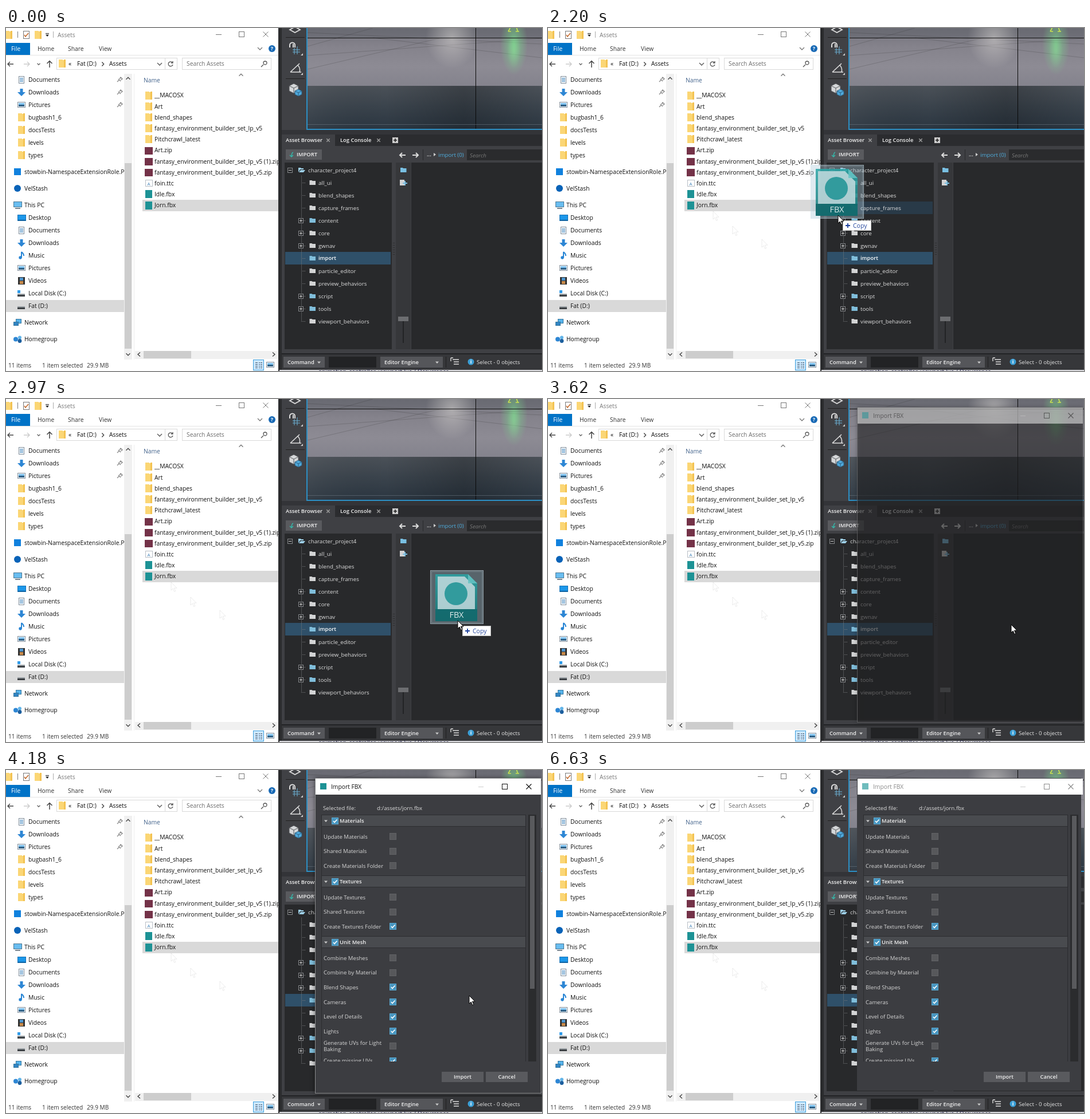
Recreate the animation shown at these times as an HTML page with a canvas. Size 935 px wide and 599 px high, loop 6750 ms.

```html
<!DOCTYPE html>
<html lang="en">
<head>
<meta charset="utf-8">
<title>Drag and drop import</title>
<style>
  html, body { margin: 0; width: 100%; height: 100%; overflow: hidden; background: #fff; }
  canvas { display: block; }
</style>
</head>
<body>
<canvas id="stage" width="935" height="599"></canvas>
<script>
const c = document.getElementById('stage').getContext('2d');
const LOOP = 6750, STEP = 110.6, LAST_STEP = 60;
const TEAL = '#1d9295';

// Drawing helpers
function rect(x, y, w, h, fill, stroke) {
  if (fill) { c.fillStyle = fill; c.fillRect(x, y, w, h); }
  if (stroke) { c.strokeStyle = stroke; c.lineWidth = 1; c.strokeRect(x + .5, y + .5, w - 1, h - 1); }
}
function path(d, x, y, fill, stroke, width = 1) {
  const shape = new Path2D(d);
  c.save();
  c.translate(x, y);
  if (fill) { c.fillStyle = fill; c.fill(shape); }
  if (stroke) { c.strokeStyle = stroke; c.lineWidth = width; c.stroke(shape); }
  c.restore();
}
function disc(x, y, r, fill) {
  c.fillStyle = fill;
  c.beginPath();
  c.arc(x, y, r, 0, 7);
  c.fill();
}
function text(s, x, y, color = '#111', size = 10.3, weight = 400, align = 'left', style = '') {
  c.font = `${style} ${weight} ${size}px "Open Sans", "Noto Sans", sans-serif`;
  c.fillStyle = color;
  c.textAlign = align;
  c.fillText(s, x, y + size * .37);
}
const label = (s, x, y, color = '#dcdcdc') => text(s, x, y, color, 9.75);
const bold = (s, x, y, color = '#f0f0f0', align) => text(s, x, y, color, 9.4, 600, align);
function clipped(x, y, w, h, draw) {
  c.save();
  c.beginPath();
  c.rect(x, y, w, h);
  c.clip();
  draw();
  c.restore();
}
function gradient(x0, y0, x1, y1, ...colors) {
  const g = c.createLinearGradient(x0, y0, x1, y1);
  colors.forEach((color, i) => g.addColorStop(i / (colors.length - 1), color));
  return g;
}
function glow(x, y, rx, ry, rgb, alpha) {
  c.save();
  c.translate(x, y);
  c.scale(rx, ry);
  const g = c.createRadialGradient(0, 0, 0, 0, 0, 1);
  g.addColorStop(0, `rgba(${rgb},${alpha})`);
  g.addColorStop(1, `rgba(${rgb},0)`);
  c.fillStyle = g;
  c.fillRect(-1, -1, 2, 2);
  c.restore();
}

const chevron = (x, y, color, size = 4, flip = 1) =>
  path(`M${-size} ${-size / 2 * flip}L0 ${size / 2 * flip}L${size} ${-size / 2 * flip}`, x, y, null, color, 1.3);
const sideChevron = (x, y, dir, color = '#444') =>
  path(`M${-2 * dir} -3.5L${2 * dir} 0L${-2 * dir} 3.5`, x, y, null, color, 1.4);
const arrow = (x, y, dir, color, width = 1.4) =>
  path(`M${-5 * dir} 0H${5 * dir}M${dir} -4L${5 * dir} 0L${dir} 4`, x, y, null, color, width);
const triangle = (x, y, color = '#ccc') => path('M-3 -1.5H3L0 2Z', x, y, color);
const cross = (x, y, r, color, width = 1) =>
  path(`M${-r} ${-r}L${r} ${r}M${r} ${-r}L${-r} ${r}`, x, y, null, color, width);

const icons = {
  folder(x, y) { rect(x - 6, y - 6, 12, 13, '#fbd675'); rect(x + 3, y - 7, 3, 14, '#f3c353'); rect(x - 6, y - 7, 7, 2, '#fbd675'); },
  doc(x, y) {
    rect(x - 5, y - 6, 10, 13, '#fff', '#7d8b99');
    for (let k = -3; k < 5; k += 2) rect(x - 3, y + k, 6, 1, '#4d8fc4');
  },
  down(x, y) { path('M-2.5 -6H2.5V0H7L0 7L-7 0H-2.5Z', x, y, '#2d86d4'); },
  pic(x, y) { rect(x - 7, y - 5, 14, 10, '#fff', '#7d8b99'); rect(x - 5, y - 3, 10, 3, '#7cc0ee'); rect(x - 5, y, 10, 3, '#2d5f85'); },
  pc(x, y) { rect(x - 7, y - 6, 15, 10, '#69bdf0', '#4a7894'); rect(x - 4, y + 5, 9, 2, '#77848e'); },
  desktop(x, y) { rect(x - 7, y - 5, 15, 11, '#1c97ea', '#1672b5'); rect(x - 6, y + 4, 13, 1, '#0c548d'); },
  music(x, y) { path('M0 -6V4M0 -6Q4 -3 4 1', x, y, null, '#2684d4', 2); disc(x - 2, y + 4, 2.7, '#2684d4'); },
  video(x, y) {
    rect(x - 6, y - 6, 12, 13, '#333');
    rect(x - 3, y - 5, 6, 5, '#4f97d1');
    rect(x - 3, y + 1, 6, 5, '#c98b4b');
  },
  disk(x, y) { rect(x - 7, y + 1, 13, 5, '#9aa0a4'); rect(x - 7, y + 3, 13, 3, '#3b3f43'); },
  system(x, y) { icons.disk(x, y); rect(x - 7, y - 5, 5, 5, '#2f9be8'); },
  network(x, y) { rect(x - 3, y - 6, 10, 8, '#56b3ec', '#33749c'); rect(x - 7, y - 1, 9, 7, '#3285c4', '#33749c'); },
  home(x, y) { disc(x - 3, y, 4, '#2d86d4'); disc(x + 4, y - 3, 3, '#62b4e8'); disc(x + 4, y + 3, 3.4, '#1d5f9e'); },
  square(x, y) { rect(x - 6, y - 6, 12, 12, '#1081de'); },
  circle(x, y) { disc(x, y, 6, '#0a63b8'); },
  zip(x, y) { rect(x - 7, y - 6, 14, 13, '#743248'); },
  font(x, y) { rect(x - 6, y - 6, 13, 12, '#fff', '#b8bec4'); text('A', x, y + 1, '#3f81b8', 8, 400, 'center'); },
  fbx(x, y) { rect(x - 6, y - 7, 12, 14, TEAL); }
};

const places = [
  ['Documents', 90, 'doc'], ['Downloads', 112, 'down'], ['Pictures', 134, 'pic'],
  ['bugbash1_6', 156, 'folder'], ['docsTests', 178, 'folder'], ['levels', 200, 'folder'], ['types', 222, 'folder'],
  ['stowbin-NamespaceExtensionRole.P', 251, 'square', 1], ['VelStash', 280, 'circle', 1], ['This PC', 309, 'pc', 1],
  ['Desktop', 331, 'desktop'], ['Documents', 353, 'doc'], ['Downloads', 375, 'down'], ['Music', 397, 'music'],
  ['Pictures', 419, 'pic'], ['Videos', 441, 'video'], ['Local Disk (C:)', 463, 'system'], ['Fat (D:)', 485, 'disk'],
  ['Network', 514, 'network', 1], ['Homegroup', 543.5, 'home', 1]
];
const files = [
  ['__MACOSX', 'folder'], ['Art', 'folder'], ['blend_shapes', 'folder'],
  ['fantasy_environment_builder_set_lp_v5', 'folder'], ['Pitchcrawl_latest', 'folder'], ['Art.zip', 'zip'],
  ['fantasy_environment_builder_set_lp_v5 (1).zip', 'zip'], ['fantasy_environment_builder_set_lp_v5.zip', 'zip'],
  ['foin.ttc', 'font'], ['Idle.fbx', 'fbx'], ['Jorn.fbx', 'fbx']
];

function drawExplorer(selectedActive) {
  rect(0, 0, 475, 599, '#fff');
  // Title bar and ribbon
  icons.folder(5, 12);
  rect(20, 6, 1, 11, '#777');
  rect(30, 5, 11, 14, '#fff', '#777');
  path('M-3 0L-1 3L4 -3', 35, 12, null, '#c2692c', 1.5);
  icons.folder(56, 12);
  rect(69, 9, 6, 1, '#222');
  triangle(72, 13, '#222');
  rect(82, 6, 1, 11, '#aaa');
  text('Assets', 90, 12, '#7a7a7a');
  rect(366, 11, 10, 1, '#777');
  rect(406, 6, 10, 10, null, '#777');
  cross(453, 11, 4.5, '#777');
  rect(0, 26, 42, 21, '#0173c7');
  text('File', 9, 36, '#fff');
  text('Home', 55, 36, '#333');
  text('Share', 108, 36, '#333');
  text('View', 162, 36, '#333');
  chevron(443, 36, '#777');
  disc(464, 36, 6, '#1769b5');
  text('?', 464, 36, '#fff', 9, 700, 'center');
  rect(0, 47, 475, 1, '#e4e4e4');
  // Address bar
  arrow(8, 63, -1, '#444');
  arrow(36, 63, 1, '#ccc');
  chevron(57, 63, '#666', 2.5);
  path('M0 6V-5M-4.5 -1L0 -5.5L4.5 -1', 76, 63, null, '#444', 1.5);
  rect(88, 52, 211, 21, '#fff', '#d9d9d9');
  icons.folder(98, 62);
  text('«', 109, 62);
  text('Fat (D:)', 124, 62);
  sideChevron(169, 63, .8);
  text('Assets', 180, 62);
  chevron(268, 63, '#555');
  rect(277, 53, 1, 19, '#d9d9d9');
  path('M3 -3A4 4 0 1 0 4 1M4 -5V-2H1', 287, 63, null, '#555', 1.3);
  rect(307, 52, 156, 21, '#fff', '#d9d9d9');
  text('Search Assets', 315, 62.5, '#6d6d6d');
  path('M-1 1L-5 5M5 -2A3 3 0 1 1 -1 -2A3 3 0 1 1 5 -2', 450, 63, null, '#555', 1.3);
  // Navigation pane
  rect(0, 475, 206, 21, '#d9d9d9');
  clipped(0, 80, 206, 485, () => {
    for (const [name, y, icon, top] of places) {
      icons[icon](top ? 20 : 27, y);
      text(name, top ? 32 : 39, y);
    }
    for (const y of [90, 112, 134])
      path('M-4 4L-1 1M-2 -1L2 3M0 -1L2 -4L5 -1L2 1', 198, y, null, '#8a8a8a', 1.4);
  });
  rect(206, 80, 14, 499, '#f0f0f0');
  rect(207, 236, 12, 324, '#cdcdcd');
  chevron(213, 88, '#444', 3.5, -1);
  chevron(213, 570, '#444', 3.5);
  rect(223, 80, 1, 499, '#ececec');
  // File list
  text('Name', 240, 91, '#40618a');
  chevron(410, 82, '#777', 3.5, -1);
  if (selectedActive) rect(238, 300, 240, 20, '#cce8ff', '#99d1ff');
  else rect(238, 300, 237, 20, '#d9d9d9');
  clipped(224, 100, 251, 460, () => files.forEach(([name, icon], k) => {
    const y = 117.5 + 19.2 * k;
    icons[icon](249, Math.round(y));
    text(name, 259, y);
  }));
  rect(225, 564, 250, 14, '#f0f0f0');
  rect(240, 564, 83, 13, '#cdcdcd');
  sideChevron(232, 570, -1);
  sideChevron(467, 570, 1);
  // Status bar
  text('11 items', 4, 589, '#333', 10.1);
  text('1 item selected', 63, 589, '#333', 10.1);
  text('29.9 MB', 141, 589, '#333', 10.1);
  rect(431, 579, 19, 19, '#cce8ff', '#3d9fdc');
  for (let y = 584; y < 595; y += 3) {
    rect(435, y, 4, 1, '#456'); rect(441, y, 2, 1, '#456'); rect(444, y, 3, 1, '#456');
  }
  icons.pic(461, 588);
}

function drawViewport(i) {
  clipped(526, 0, 409, 176, () => {
    rect(526, 0, 409, 101, gradient(0, 0, 0, 101, '#73737b', '#85838c', '#8d8b94', '#84838d'));
    rect(526, 101, 409, 75, gradient(0, 101, 0, 176, '#4b5158', '#3a434c', '#2b3641'));
    rect(526, 101, 409, 75, gradient(526, 0, 935, 0, '#8080801c', '#0000', '#0003', '#0000'));
    rect(526, 0, 409, 17, '#4a4d5440');
    for (const [x0, y0, x1, y1] of [[526, 32, 640, 0], [526, 48, 935, 18], [526, 72, 760, 17], [526, 8, 935, 28], [640, 17, 935, 52]])
      path(`M${x0} ${y0}L${x1} ${y1}`, 0, 0, null, '#3335', .7);
    glow(778, 18, 46, 52, '225,222,218', .5);
    const pulse = .62 + .1 * Math.sin(i * .9);
    glow(886, 28, 24, 54, '118,235,140', pulse);
    glow(886, 40, 12, 30, '150,255,160', pulse * .5);
    path('M-9 6L-6 1V-2M8 6L6 1V-2M-9 6H-4M4 6H10', 885, 0, null, '#c9e24f', 1.6);
    rect(526, 17, 409, 1, '#111');
    rect(819, 0, 1, 176, '#0a0a0a');
    rect(526, 168, 409, 1, '#74808a80');
  });
  rect(524, 0, 2, 178, '#2c8fc4');
  rect(524, 176, 411, 2, '#2c8fc4');
}

const tree = ['all_ui', 'blend_shapes', 'capture_frames', '+content', '+core', '+gwnav', 'import',
  'particle_editor', 'preview_behaviors', '+script', '+tools', 'viewport_behaviors'];
const blueFolders = ['content', 'import', 'script', 'tools'];
const smallFolder = (x, y, color) => path('M-5 -4H-1L0 -3H5.5V4H-5Z', x, y, color);
function expander(x, y, plus) {
  rect(x - 4, y - 4, 9, 9, '#28292b', '#85878a');
  rect(x - 2, y, 5, 1, '#ccc');
  if (plus) rect(x, y - 2, 1, 5, '#ccc');
}

function drawEditor(i, hoverRow) {
  rect(475, 0, 460, 599, '#2a2b2d');
  rect(481, 0, 454, 185, '#404145');
  // Tool column
  path('M-9 0L0 -5L9 0L0 5Z', 504, 3, null, '#ddd', 1.8);
  rect(488, 16, 33, 1, '#222');
  path('M-2 -2V-8M-8 -2V-6A4.500 4.500 0 0 1 1 -6V-2', 503, 36, null, '#ddd', 2);
  path('M-3 2H10M-3 6H10M0 -1V10M5 -4V10', 503, 36, null, '#6cb4d9');
  path('M-9 7H10M-9 7L7 -8M4 -5Q9 0 7 7', 505, 70, null, '#ddd', 1.6);
  for (const y of [48, 82]) path('M0 0V-4L-4 0Z', 518, y, '#ccc');
  rect(488, 88, 33, 1, '#222');
  path('M-8 -5L0 -9L8 -5V4L0 8L-8 4Z', 502, 106, '#d5d7d9', '#55575a');
  path('M-8 -5L0 -1L8 -5M0 -1V8', 502, 106, null, '#55575a');
  path('M-6 -3L0 -6L6 -3V3L0 6L-6 3Z', 510, 113, '#4fa9dc', '#2c5c7c');
  path('M-6 -3L0 0L6 -3M0 0V6', 510, 113, null, '#2c5c7c');
  drawViewport(i);
  // Tabs
  rect(481, 178, 454, 8, '#333438');
  rect(481, 186, 454, 20, '#2b2c2f');
  rect(481, 186, 93, 20, '#3f4044');
  bold('Asset Browser', 488, 196);
  cross(562, 196, 2.7, '#999', 1.6);
  bold('Log Console', 583, 196);
  cross(650, 196, 2.7, '#999', 1.6);
  rect(674, 191, 10, 10, '#ccc');
  path('M-3 0H3M0 -3V3', 679, 196, null, '#222', 1.6);
  rect(481, 206, 454, 363, '#3f4044');
  rect(488, 212, 63, 18, '#595a5e');
  path('M2 -4Q-1 -3 -1 4M-4 1L-1 4L2 1', 499, 221, null, '#36b5a8', 1.5);
  bold('IMPORT', 507, 221);
  // Project tree
  rect(486, 235, 187, 326, '#28292b');
  if (hoverRow > 0 && hoverRow <= tree.length) rect(487, 237 + 22 * hoverRow, 184, 22, '#293a48');
  rect(487, 391, 184, 22, '#2f5069');
  expander(495, 248);
  path('M-5 -4H-1L0 -3H4V-1H-2L-5 4ZM-1 0H7L4 4H-4Z', 515, 248, '#9ed0e8');
  label('character_project4', 527, 248);
  for (let y = 258; y < 512; y += 2) rect(515, y, 1, 1, '#77797b');
  tree.forEach((item, k) => {
    const y = 270 + 22 * k, name = item.replace('+', '');
    for (let x = 515; x < 523; x += 2) rect(x, y, 1, 1, '#77797b');
    if (item !== name) expander(514, y, true);
    smallFolder(534.5, y, blueFolders.includes(name) ? '#80bedb' : '#d3d4d5');
    if (name === 'import') bold(name, 545, y, '#fff');
    else label(name, 545, y);
  });
  for (let y = 375; y < 396; y += 4) { rect(675, y, 1, 1, '#222'); rect(677, y, 1, 1, '#222'); }
  // Content pane
  arrow(692, 222, -1, '#ddd', 2);
  arrow(714, 222, 1, '#ddd', 2);
  rect(727, 212, 1, 19, '#2a2b2d');
  bold('...', 734, 221);
  path('M-2 -3L2 0L-2 3Z', 748, 221, '#ccc');
  label('import (0)', 754, 221, '#4fadde');
  rect(804, 212, 131, 19, '#2a2b2d');
  text('Search', 809, 222, '#777', 9.75, 400, 'left', 'italic');
  rect(680, 235, 26, 326, '#36373a');
  rect(707, 235, 228, 326, '#28292b');
  smallFolder(693, 248, '#79bfe2');
  rect(687, 265, 8, 10, '#d3d4d5');
  path('M0 -4V4M-4 0H4', 696, 271, null, '#79bfe2', 2);
  rect(692, 512, 2, 38, '#222325');
  rect(684, 504, 18, 8, '#6c6d70');
  // Command bar
  rect(481, 568, 454, 2, '#222325');
  rect(481, 570, 454, 27, '#36373a');
  rect(484, 574, 72, 19, '#55565a');
  bold('Command', 491, 583.5);
  triangle(546, 584);
  rect(563, 574, 83, 19, '#222325');
  rect(653, 574, 109, 19, '#55565a');
  bold('Editor Engine', 660, 583.5);
  triangle(752, 584);
  rect(767, 574, 1, 19, '#222');
  path('M-5 -4H6M-3 0H6M-3 4H6M-8 -7V-1M-8 -7H-4', 784, 583, null, '#ddd', 1.4);
  disc(811, 583, 5.5, '#3c9fd6');
  text('i', 811, 583, '#fff', 9, 700, 'center');
  label('Select - 0 objects', 821, 583, '#e5e5e5');
  rect(477, 597, 458, 2, '#d8d8dc');
  clipped(477, 596, 458, 3, () => text('animation_controller_viewport.lua / Occurrence', 545, 600, '#224'));
}

function checkbox(x, y, on) {
  rect(x - 6, y - 6, 12, 12, on ? '#4795bf' : '#57585b', on ? '#5baad2' : '#626366');
  if (on) path('M-3 0L-1 2.500L3.500 -2.500', x, y, null, '#fff', 1.7);
}
const sections = [
  ['Materials', 89, ['Update Materials', 'Shared Materials', 'Create Materials Folder'], ''],
  ['Textures', 195, ['Update Textures', 'Shared Textures', 'Create Textures Folder'], '2'],
  ['Unit Mesh', 301, ['Combine Meshes', 'Combine by Material', 'Blend Shapes', 'Cameras', 'Level of Details', 'Lights',
    'Generate UVs for Light|Baking', 'Create missing UVs'], '23457']
];

function drawDialog(loaded, closing) {
  const h = closing ? 546 : 551, ink = closing ? '#8c8c8c' : '#111';
  c.shadowColor = '#0008';
  c.shadowBlur = closing ? 0 : 7;
  rect(539, 14, closing ? 391 : 395, h, loaded ? '#3c3d41' : '#28292b');
  c.shadowBlur = 0;
  rect(540, 15, 393, 28, '#fff');
  if (!closing) rect(539, 14, 395, h, null, '#8b8c8e');
  rect(548, 23, 11, 11, closing ? '#6fbcbd' : TEAL);
  text('Import FBX', 567, 29, ink);
  rect(824, 29, 9, 1, '#ccc');
  rect(865, 24, 10, 10, null, ink);
  cross(912, 29, 4.5, ink, 1.2);
  if (!loaded) return;
  label('Selected file:', 553, 66);
  label('d:/assets/jorn.fbx', 647, 66);
  clipped(545, 78, 385, 431, () => {
    rect(550, 78, 357, 440, null, '#2c2d30');
    for (const [title, top, options, checked] of sections) {
      rect(550, top - 11, 357, 21, '#494b4f', '#2c2d30');
      triangle(558, top);
      checkbox(574, top, true);
      bold(title, 582, top);
      options.forEach((option, k) => {
        const y = top + 27 + 25.65 * k, lines = option.split('|');
        lines.forEach((s, n) => text(s, 554, y + (lines.length > 1 ? n * 11 - 5 : 0), '#d6d6d6', 9.6, 500));
        checkbox(675, Math.round(y), checked.includes(k));
      });
    }
    rect(911, 78, 14, 432, '#2b2c2e');
    rect(914, 80, 8, 302, '#595a5d');
  });
  for (const [x, name] of [[760, 'Import'], [837, 'Cancel']]) {
    rect(x, 527, 73, 18, '#595a5e');
    bold(name, x + 36.5, 536, '#f0f0f0', 'center');
  }
}

// Pointer tip positions: [step, x, y]
const route = [
  [1, 640, 585], [2, 605, 555], [3, 555, 505], [4, 490, 445], [5, 425, 400], [6, 373, 369], [7, 322, 346],
  [8, 288, 320], [9, 270, 314], [16, 272, 315], [17, 286, 317], [18, 332, 321], [19, 415, 325], [20, 506, 327],
  [21, 560, 333], [22, 606, 337], [23, 650, 347], [25, 730, 368], [27, 788, 387], [28, 802, 392], [29, 808, 394],
  [39, 808, 394], [40, 798, 412], [41, 765, 434], [42, 690, 390], [44, 580, 180], [45, 550, 60], [46, 540, -30]
];
function pointerAt(i) {
  const n = route.findIndex(key => key[0] >= i);
  if (i < 1 || n < 0) return null;
  const [i1, x1, y1] = route[n], [i0, x0, y0] = route[Math.max(0, n - 1)];
  const f = i1 > i0 ? (i - i0) / (i1 - i0) : 1;
  return [Math.round(x0 + (x1 - x0) * f), Math.round(y0 + (y1 - y0) * f)];
}
const POINTER = 'M0 0V14L3.300 11L5.600 16.500L7.800 15.500L5.500 10.200H10Z';

function drawDragged(x, y) {
  c.save();
  c.translate(x, y);
  c.globalAlpha = .85;
  rect(-48, -88, 93, 94, '#a9c6d670', '#d5e6ef90');
  rect(-46, -86, 89, 90, null, '#dcecf440');
  path('M-39 -81H18L34 -65V1H-39Z', 0, 0, gradient(0, -81, 0, 1, '#2aa6a6', '#157678'));
  path('M-35 -77H12L30 -59V-20H-35Z', 0, 0, '#c5dbdf');
  path('M18 -81V-65H34Z', 0, 0, '#66c4c4');
  disc(-3, -47, 20, TEAL);
  rect(-39, -20, 73, 21, '#12696d');
  text('FBX', -2, -10, '#fff', 14.5, 500, 'center');
  c.globalAlpha = 1;
  rect(8, 9, 50, 18, '#fff', '#c4c4c4');
  path('M-4 0H4M0 -4V4', 17, 18, null, '#1b3f9c', 1.8);
  text('Copy', 26, 18, '#2a4ba0', 10.5);
  c.restore();
}

function draw(i) {
  const pointer = pointerAt(i), dragging = i >= 16 && i < 33;
  const overTree = dragging && pointer[0] > 487 && pointer[0] < 672;
  drawEditor(i, overTree ? Math.floor((pointer[1] - 240) / 22) : 0);
  drawExplorer(i >= 9 && i < 16);
  // Faint pointer trail left on the file list
  c.globalAlpha = .08;
  for (const [step, x, y] of route.slice(5, 8)) if (i > step) path(POINTER, x, y, null, '#000');
  c.globalAlpha = 1;
  if (i >= 33) {
    if (i === 33) c.globalAlpha = .5;
    drawDialog(i >= 38, i === LAST_STEP);
    c.globalAlpha = 1;
  }
  if (dragging) drawDragged(...pointer);
  if (pointer) path(POINTER, ...pointer, '#fff', '#000');
}

let shown = -1;
function tick() {
  const t = performance.now() % LOOP;
  const i = Math.min(LAST_STEP, Math.floor((t + 34) / STEP));
  if (i !== shown) draw(shown = i);
  requestAnimationFrame(tick);
}
tick();
</script>
</body>
</html>
```
